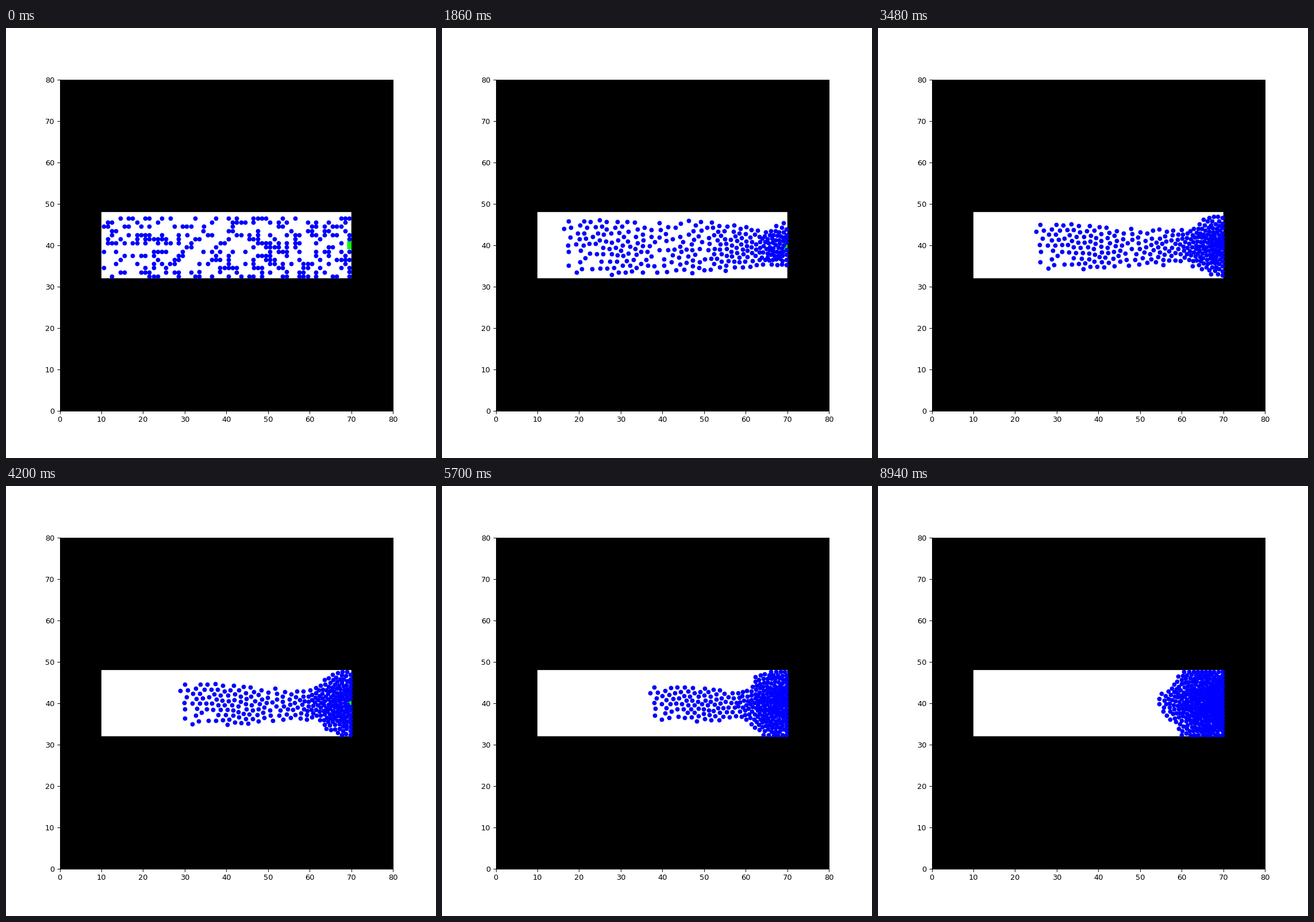
A matplotlib script for the animation above (9 s loop, 748 by 748 pixels).

```python
import numpy as np
import matplotlib.pyplot as plt
from matplotlib.animation import FuncAnimation
from matplotlib.patches import Rectangle

FRAMES, INTERVAL = 150, 60
PEOPLE = 288
GOAL = np.array([70.0, 40.0])
LOW, HIGH = np.array([10.3, 32.35]), np.array([69.7, 47.6])
SPEED, RELAX = 0.329, 10.8                # units per frame, frames
PUSH, REACH, FALLOFF = 0.018, 1.12, 0.12  # repulsion between people
STEPS = 4
EXIT_EVERY = 10

# people standing at both ends of the corridor: column -> rows
ENDS = {
    10: (44, 38, 34),
    11: (45, 44, 41, 40),
    12: (45, 43, 42, 40, 32),
    13: (43, 40, 38, 35),
    14: (46, 41, 36, 33),
    69: (46, 42, 41, 38, 36, 34, 33, 32),
}


def start(rng):
    fixed = [(x, y) for x, rows in ENDS.items() for y in rows]
    cells = [(x, y) for x in range(15, 69) for y in range(32, 47)]
    rest = rng.choice(cells, PEOPLE - len(fixed), replace=False)
    pos = np.vstack([fixed, rest]) + 0.5
    return pos + rng.normal(0, 0.004, pos.shape)


def accel(pos, vel):
    to_goal = GOAL - pos
    dist = np.hypot(*to_goal.T)[:, None]
    drive = (SPEED * to_goal / np.maximum(dist, 0.3) - vel) / RELAX
    dx = pos[:, None, 0] - pos[None, :, 0]
    dy = pos[:, None, 1] - pos[None, :, 1]
    r = np.hypot(dx, dy) + 1e-6
    force = np.minimum(PUSH * np.exp((REACH - r) / FALLOFF), 0.3) / r
    np.fill_diagonal(force, 0)
    return drive + np.column_stack([(force * dx).sum(1), (force * dy).sum(1)])


def simulate():
    pos = start(np.random.default_rng(12))
    vel = np.zeros_like(pos)
    path = [pos]
    for frame in range(1, FRAMES):
        for _ in range(STEPS):
            vel = vel + accel(pos, vel) / STEPS
            pace = np.hypot(*vel.T)[:, None]
            vel *= np.minimum(1, 0.4 / np.maximum(pace, 1e-9))
            moved = pos + vel / STEPS
            pos = np.clip(moved, LOW, HIGH)
            vel[pos != moved] = 0
        if frame % EXIT_EVERY == 0:
            dist = np.hypot(*(pos - GOAL).T)
            first = dist.argmin()
            if dist[first] < 0.6:
                pos = np.delete(pos, first, axis=0)
                vel = np.delete(vel, first, axis=0)
        path.append(pos)
    return path


fig, ax = plt.subplots(figsize=(8, 8), dpi=93.5)
ax.set(xlim=(0, 80), ylim=(0, 80), facecolor="black")


def box(x, y, w, h, color):
    ax.add_patch(Rectangle((x, y), w, h, color=color, lw=0, snap=False))


box(10, 32, 60, 16, "white")
box(69, 39, 1, 2, "lime")
dots, = ax.plot([], [], "o", color="blue", markersize=5)

path = simulate()


def draw(frame):
    dots.set_data(*path[frame].T)
    return dots,


anim = FuncAnimation(fig, draw, frames=FRAMES, interval=INTERVAL,
                     repeat=True, repeat_delay=0)
plt.show()
```
